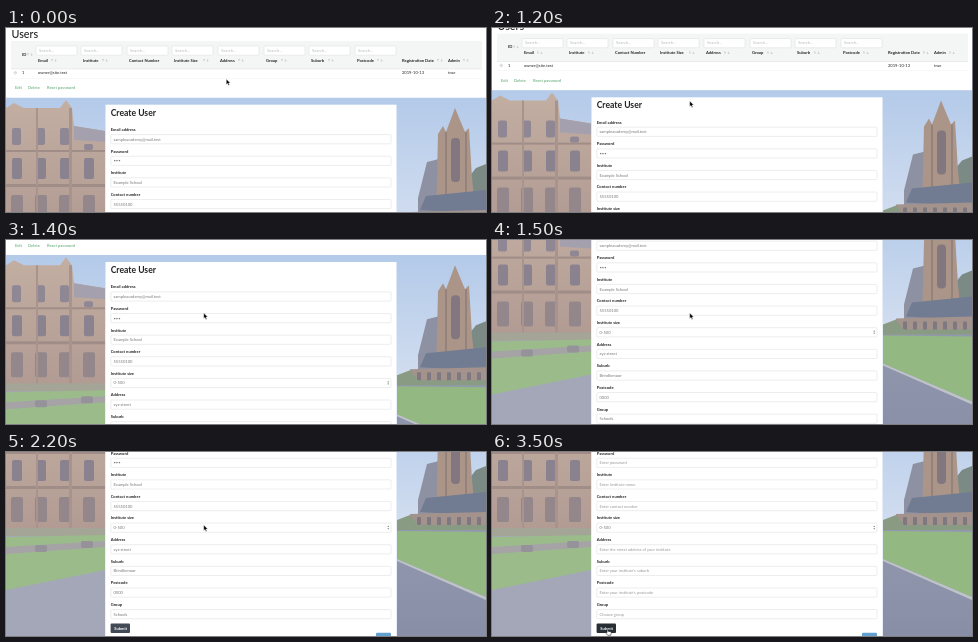
An HTML page that plays this animation: 480x184 px, repeating every 3600 ms.

```html
<!DOCTYPE html>
<html lang="en">
<head>
<meta charset="utf-8">
<title>Create User</title>
<style>
  html, body { margin: 0; height: 100%; overflow: hidden; background: #fff; }
  svg { display: block; width: 100vw; height: 100vh; }
  text { font: 4.1px Lato, sans-serif; fill: #222; white-space: pre; }
  .b { font-weight: 700; }
  .users { font-size: 10.75px; font-weight: 500; }
  .title { font-size: 8.6px; font-weight: 700; }
  .link { fill: #55a36b; }
  .value { fill: #777; }
  .hint { fill: #999; font-size: 4.03px; }
  .faint { fill: #bbb; }
  .white { fill: #fff; font-weight: 700; }
  .box { fill: #fff; stroke: #d9dadb; stroke-width: .5; }
</style>
</head>
<body>
<svg viewBox="0 0 480 184">
  <defs>
    <linearGradient id="sky" x2="0" y2="1">
      <stop stop-color="#b3cae9"/><stop offset=".5" stop-color="#d3def0"/>
    </linearGradient>
    <linearGradient id="stone" x2="0" y2="1">
      <stop stop-color="#c3aea2"/><stop offset="1" stop-color="#b09a92"/>
    </linearGradient>
    <linearGradient id="road" x2="0" y2="1">
      <stop stop-color="#9299ae"/><stop offset="1" stop-color="#858ba4"/>
    </linearGradient>
  </defs>
  <g id="page"></g>
  <path id="arrow" d="M0 0V5.6L1.3 4.4 2.2 6.5 3.2 6.1 2.3 4.1H4Z" fill="#000" stroke="#fff" stroke-width=".4"/>
  <path id="hand" d="M.6 -.4Q1.1 -1 1.6 -.4V1.7L4.3 2.2Q5 2.5 4.8 3.6L4.2 5.8H1.2L-.8 3.4Q-.6 2.4 .6 3.1Z" fill="#fff" stroke="#000" stroke-width=".5"/>
</svg>
<script>
const $ = id => document.getElementById(id);
const text = (x, y, s, cls = '') => `<text x="${x}" y="${y}" class="${cls}">${s}</text>`;
const rect = (x, y, w, h, fill, r = 0) =>
  `<rect x="${x}" y="${y}" width="${w}" height="${h}" rx="${r}" fill="${fill}"/>`;
const box = (x, y, w, h) => `<rect class="box" x="${x}" y="${y}" width="${w}" height="${h}" rx="1"/>`;
const poly = (points, fill) => `<polygon points="${points}" fill="${fill}"/>`;
const repeat = (n, fn) => Array.from({ length: n }, (_, i) => fn(i)).join('');
const arrows = (x, y) =>
  `<path d="M${x} ${y}v-2.4m-.8 .8l.8 -.8 .8 .8M${x + 3.6} ${y - 2.4}v2.4m-.8 -.8l.8 .8 .8 -.8" fill="none" stroke="#aaa" stroke-width=".4"/>`;

// Columns: x, heading, x of the sort arrows
const columns = [
  [32, 'Email', 45], [77, 'Institute', 96], [123, 'Contact Number'],
  [168, 'Institute Size', 197], [214, 'Address', 232], [260, 'Group', 275],
  [305, 'Suburb', 322], [351, 'Postcode', 371], [396, 'Registration Date', 431],
  [442, 'Admin', 457]
];

// Fields: label, value, placeholder
const fields = [
  ['Email address', 'sampleacademy@mail.test', 'Enter email'],
  ['Password', '•••', 'Enter password'],
  ['Institute', 'Example School', 'Enter institute name'],
  ['Contact number', '55550100', 'Enter contact number'],
  ['Institute size', '0-500', '0-500'],
  ['Address', 'xyz street', 'Enter the street address of your institute'],
  ['Suburb', 'Brindlemoor', "Enter your institute's suburb"],
  ['Postcode', '0000', "Enter your institute's postcode"],
  ['Group', 'Schools', 'Choose group']
];

const leftSide = () =>
  poly('0,80 8,75 18,80 54,80 60,72 66,80 68,98 99,103 99,206 0,206', 'url(#stone)') +
  poly('68,98 99,103 99,114 68,112', '#a5a0ad') +
  rect(0, 122, 99, 2, '#a18d87') + rect(0, 156, 99, 3, '#a18d87') +
  repeat(4, i => rect(6 + i * 24, 100 + (i > 2) * 16, 9, 17 - (i > 2) * 11, '#8f8794', 2) +
    rect(6 + i * 24, 130, 10, 21, '#8a838f', 2) + rect(5 + i * 24, 167, 12, 25, '#93878c', 2)) +
  rect(30, 80, 2, 126, '#a8948c') + rect(63, 80, 3, 126, '#a8948c') +
  rect(0, 198, 99, 9, '#a4a596') +
  // lawn, kerb and paving
  rect(0, 206, 99, 130, '#a3a7b8') +
  poly('0,207 99,205 99,240 0,260', '#9bbb8b') +
  poly('0,217 99,211 99,217 0,224', '#a5a3a6') +
  rect(29, 215, 12, 7, '#95929a', 2) + rect(75, 211, 12, 7, '#95929a', 2);

const rightSide = () =>
  poly('462,150 470,140 480,136 480,172 462,172', '#7c8a86') +
  poly('412,170 421,134 437,130 437,188 412,188', '#8d91a2') +
  poly('430,190 432,106 437,98 440,104 449,80 459,104 463,100 466,150 470,190', '#ab9588') +
  rect(445, 110, 9, 44, '#82777f', 4) +
  rect(439, 104, 2, 80, '#95827b') + rect(459, 104, 2, 80, '#95827b') +
  poly('414,182 420,168 480,162 480,186', '#717b92') +
  poly('404,184 480,182 480,200 404,200', '#a3938c') +
  repeat(7, i => rect(411 + i * 10, 187, 4, 9, '#7e7880', 1)) +
  poly('391,190 404,185 412,195 480,195 480,202 391,202', '#8a9b84') +
  // lawn, kerb and road
  rect(391, 200, 89, 136, 'url(#road)') +
  poly('391,201 480,202 480,267 391,229', '#93b882') +
  poly('391,229 480,267 480,270 391,231', '#bfc3c9');

const scenery = () => rect(0, 69.5, 480, 260, 'url(#sky)') + leftSide() + rightSide();

const table = () =>
  rect(0, 0, 480, 69.5, '#fff') + text(5.5, 9.8, 'Users', 'users') +
  rect(5, 13, 471, 28, '#f4f5f5') + rect(5, 40.7, 471, .5, '#ddd') + rect(5, 50, 471, .4, '#eee') +
  text(16, 27.6, 'ID', 'b') + arrows(22, 27.5) +
  columns.map(([x, name, sort], i) =>
    (i < 8 ? box(x - 2, 18, 41, 9.2) + text(x + 1, 23.9, 'Search...', 'faint') : '') +
    text(x, 33.6, name, 'b') + (sort ? arrows(sort + 1, 33.4) : '')).join('') +
  '<circle cx="9.3" cy="44.8" r="1.3" fill="none" stroke="#aaa" stroke-width=".4"/>' +
  rect(8.6, 44.6, 1.4, .4, '#aaa') +
  text(16, 46, '1') + text(32, 46, 'owner@site.test') + text(396, 46, '2019-10-13') + text(442, 46, 'true') +
  text(9, 61.4, 'Edit', 'link') + text(22, 61.4, 'Delete', 'link') + text(41, 61.4, 'Reset password', 'link');

const form = () =>
  rect(99.5, 76.7, 291, 260, '#fff') + text(104.7, 87.9, 'Create User', 'title') +
  fields.map(([label], i) => {
    const y = 101.2 + 21.62 * i;
    return text(104.7, y + 1.8, label, 'b') + box(104.8, y + 5.4, 280.2, 9.2) +
      `<text class="field" x="107.5" y="${y + 11.5}"></text>`;
  }).join('') +
  '<path d="M381.4 197l.8 -1.3 .8 1.3zM381.4 198.2l.8 1.3 .8 -1.3z" fill="#555"/>' +
  '<rect id="submit" x="104.6" y="293.6" width="19.4" height="9.4" rx="1"/>' +
  text(108.2, 299.8, 'Submit', 'white') +
  rect(370, 302.8, 15, 9.4, '#62a0d2', 1) + text(373, 309, 'Back', 'white');

$('page').innerHTML = scenery() + table() + form();
const inputs = [...document.querySelectorAll('.field')];

// Keyframes: time, value
const scrollKeys = [[1000, 0], [1100, 2], [1200, 7.4], [1300, 25], [1400, 54.7], [1500, 105.4],
  [1600, 116], [1700, 121], [1800, 123.5], [1900, 124], [2000, 123.5], [2200, 122]];

function track(keys, t) {
  const i = keys.findIndex(k => k[0] > t);
  if (i < 0) return keys[keys.length - 1][1];
  if (i === 0) return keys[0][1];
  const [t0, a] = keys[i - 1], [t1, b] = keys[i];
  return a + (b - a) * (t - t0) / (t1 - t0);
}

function ease(t, from, to) {
  const p = Math.min(1, Math.max(0, (t - from) / (to - from)));
  return p * p * (3 - 2 * p);
}

function draw(now) {
  const t = Math.floor(now % 3600 / 100) * 100;
  const first = ease(t, 0, 600), second = ease(t, 2400, 3200);
  const x = 220.3 - 22.6 * first - 83.2 * second;
  const y = 51 + 22 * first + 104.5 * second;
  const scroll = track(scrollKeys, t);
  const over = x < 124 && y + scroll > 293;
  const cleared = t >= 3500;

  $('page').setAttribute('transform', `translate(0 ${-scroll})`);
  $('submit').setAttribute('fill', over ? '#272e36' : '#424b55');
  for (const [id, shown] of [['arrow', !over], ['hand', over]]) {
    $(id).setAttribute('transform', `translate(${x} ${y})`);
    $(id).style.display = shown ? '' : 'none';
  }
  inputs.forEach((input, i) => {
    input.textContent = fields[i][cleared ? 2 : 1];
    input.setAttribute('class', cleared && i !== 4 ? 'field hint' : 'field value');
  });
}

const start = performance.now();
function loop() {
  draw(performance.now() - start);
  requestAnimationFrame(loop);
}
loop();
</script>
</body>
</html>
```
